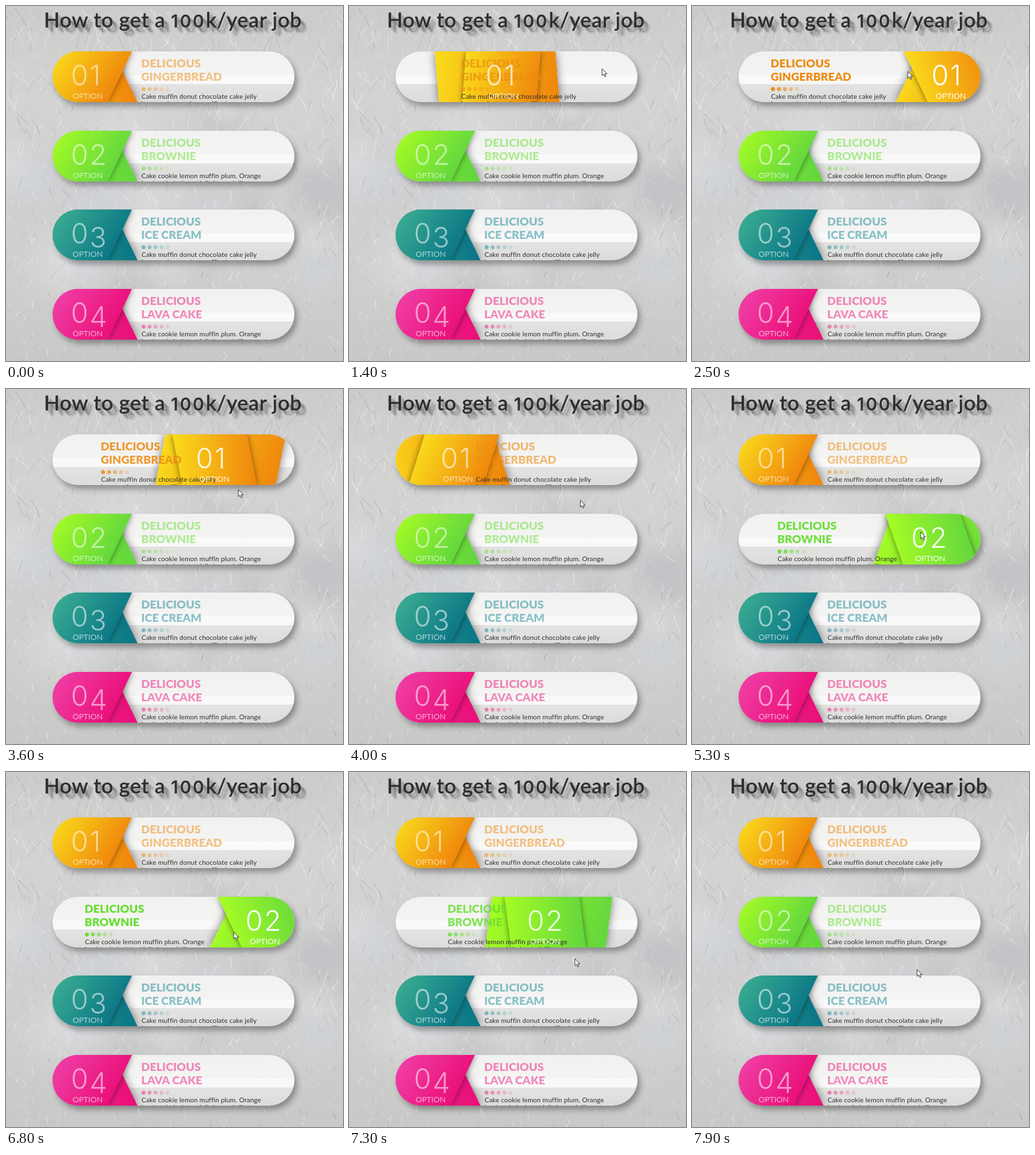
An HTML page with a canvas for the animation above (8000 ms loop, 506x532 px).

```html
<!DOCTYPE html>
<html lang="en">
<head>
<meta charset="utf-8">
<title>Option cards</title>
<style>
  html, body { margin: 0; width: 100%; height: 100%; overflow: hidden; background: #cdcdcb; }
  #stage { position: relative; width: 506px; height: 532px; overflow: hidden; font-family: Lato, "Open Sans", sans-serif; }
  #backdrop, #cursor { position: absolute; left: 0; top: 0; }
  #cursor { z-index: 1; }
  h1 {
    position: absolute; left: 57px; top: 1px; margin: 0;
    font-size: 31px; line-height: 38px; font-weight: 500; letter-spacing: .018em;
    white-space: nowrap; color: #2c2c2e; -webkit-text-stroke: .35px #2c2c2e;
    text-shadow: 4px 4px 2px rgba(0,0,0,.2), 7px 7px 2px rgba(0,0,0,.22), 9px 9px 3px rgba(0,0,0,.12);
  }
  h1 span { font-family: Inter, Lato, sans-serif; font-size: .84em; letter-spacing: .1em; }
  .card {
    --p: 0;
    position: absolute; left: 70px; top: calc(68px + var(--row) * 118.5px);
    width: 363px; height: 76px; border-radius: 38px; overflow: hidden;
    background: linear-gradient(#f1f1f0, #f4f4f3 47%, #fafafa 48%, #f8f8f8 64%, #e3e3e2 65%, #dcdcdb);
    box-shadow: 4px 6px 9px rgba(0,0,0,.33);
  }
  .back, .front {
    position: absolute; top: 0; height: 100%;
    background: linear-gradient(100deg, var(--from), var(--to));
  }
  .back {
    left: -72.5px; width: 181px; box-shadow: 0 0 13px rgba(0,0,0,.5);
    transform: translateX(calc(var(--p) * 326.5px)) skewX(calc(26deg - var(--p) * 52deg));
  }
  .front {
    left: -11px; width: 112px; box-shadow: 0 0 9px rgba(0,0,0,.5);
    transform: translateX(calc(var(--p) * 277px)) skewX(calc(-25.5deg + var(--p) * 51deg));
  }
  .card svg { position: absolute; left: 0; top: 0; }
  .copy { transform: translateX(calc(var(--p) * -85px)); }
  .name { fill: var(--ink); opacity: calc(.5 + var(--p) * .5); font-size: 17px; font-weight: 900; }
  .body { fill: #303030; font-size: 10px; letter-spacing: .01em; }
  .num, .option { fill: #fff; }
  .num {
    font: 350 42px Inter, Lato, sans-serif; letter-spacing: .05em;
    opacity: calc(.55 + var(--p) * .45); transform: translateX(calc(var(--p) * 262px));
  }
  .option {
    font-size: 11.8px; opacity: calc(.65 + var(--p) * .35);
    transform: translateX(calc(var(--p) * 266px));
  }
</style>
</head>
<body>
<div id="stage">
  <canvas id="backdrop" width="506" height="532"></canvas>
  <h1>How to get a <span>100</span>k/year job</h1>
  <svg id="cursor" width="10" height="15" viewBox="-1 -1 10 15">
    <path d="M0 0V10.3L2.4 8.1 4.2 12 5.9 11.2 4.2 7.5H7.4Z" fill="#fff" stroke="#333" stroke-width=".9"/>
  </svg>
</div>
<script>
const stage = document.getElementById('stage');
const cursor = document.getElementById('cursor');
const LOOP = 8000, STEP = 100, SLIDE = 1000;

const donut = ['Cake muffin donut chocolate cake jelly', 'beans cake topping souffle dessert'];
const lemon = ['Cake cookie lemon muffin plum. Orange', 'bonbon halvah tart jelly beans lollipop'];

// over / out: when the pointer enters and leaves the card
const options = [
  { name: 'GINGERBREAD', body: donut, from: '#fadb1c', to: '#ef850c', ink: '#ec8c12', over: 960, out: 3248 },
  { name: 'BROWNIE', body: lemon, from: '#a6fc25', to: '#62d63e', ink: '#68de32', over: 4513, out: 6900 },
  { name: 'ICE CREAM', body: donut, from: '#3cae92', to: '#0b7686', ink: '#1d8a96' },
  { name: 'LAVA CAKE', body: lemon, from: '#f040a8', to: '#ea0f78', ink: '#ea1f80' }
];

// pointer stops: time, x, y
const stops = [
  [0, 525, 112], [1400, 380, 94], [2500, 324, 98], [2800, 324, 98],
  [3600, 349, 151], [4800, 344, 198], [6100, 342, 240], [6800, 342, 240], [7500, 338, 296]
];

function addCard(o, i) {
  const dots = [0, 1, 2, 3, 4].map(k =>
    `<circle cx="${136.5 + 9 * k}" cy="56.5" r="3" opacity="${1 - k * .19}"/>`).join('');
  const drop = i > 1 ? 6 : 0;   // 3 and 4 hang below the baseline
  const card = document.createElement('div');
  card.className = 'card';
  card.style.cssText = `--row:${i};--from:${o.from};--to:${o.to};--ink:${o.ink}`;
  card.innerHTML = `
    <div class="back"></div><div class="front"></div>
    <svg width="363" height="76">
      <g class="copy">
        <g class="name">
          <text x="133" y="24">DELICIOUS</text>
          <text x="133" y="44">${o.name}</text>
          ${dots}
        </g>
        <g class="body">
          <text x="133.5" y="71">${o.body[0]}</text>
          <text x="133.5" y="82.3">${o.body[1]}</text>
        </g>
      </g>
      <text class="num" x="27.5" y="51">0<tspan dy="${drop}">${i + 1}</tspan></text>
      <text class="option" x="30" y="71">OPTION</text>
    </svg>`;
  stage.append(card);
  return card;
}

function paintBackdrop() {
  const { width: w, height: h } = stage.querySelector('canvas');
  const c = document.getElementById('backdrop').getContext('2d');
  let seed = 71;
  const rnd = () => (seed = seed * 16807 % 2147483647) / 2147483647;
  const between = (a, b) => a + rnd() * (b - a);

  const base = c.createLinearGradient(0, 0, 0, h);
  ['#cbcbc9', '#d3d3d2', '#cfcfd0', '#cfcfce', '#c8c8c7'].forEach((ink, k) => base.addColorStop(k / 4, ink));
  c.fillStyle = base;
  c.fillRect(0, 0, w, h);

  // soft light and dark patches in the middle of the scene
  for (let k = 0; k < 24; k++) {
    const x = between(0, w), y = between(140, 430), r = between(20, 80);
    const ink = ['240,240,240', '176,179,184', '206,216,232'][k % 3];
    const glow = c.createRadialGradient(x, y, 0, x, y, r);
    glow.addColorStop(0, `rgba(${ink},.3)`);
    glow.addColorStop(1, `rgba(${ink},0)`);
    c.fillStyle = glow;
    c.fillRect(x - r, y - r, 2 * r, 2 * r);
  }

  // thin scratches, longest at the top
  for (let k = 0; k < 1300; k++) {
    const x = between(0, w), y = between(0, h);
    const len = between(4, 12 + 38 * (1 - y / h) ** 2);
    const a = Math.PI / 2 + between(-.9, .9);
    const ex = x + Math.cos(a) * len, ey = y + Math.sin(a) * len;
    const ink = k % 4 ? '248,248,248' : '158,160,164';
    c.strokeStyle = `rgba(${ink},${between(.2, .7)})`;
    c.lineWidth = between(.4, 1.1);
    c.beginPath();
    c.moveTo(x, y);
    c.quadraticCurveTo((x + ex) / 2 + between(-6, 6), (y + ey) / 2, ex, ey);
    c.stroke();
  }
}

const clamp = s => Math.min(1, Math.max(0, s));
const smooth = s => clamp(s) ** 2 * (3 - 2 * clamp(s));

function pointerAt(t) {
  const k = stops.findLastIndex((s, i) => s[0] <= t && i < stops.length - 1);
  const [t0, x0, y0] = stops[k], [t1, x1, y1] = stops[k + 1];
  const s = clamp((t - t0) / (t1 - t0));
  return [x0 + (x1 - x0) * s, y0 + (y1 - y0) * s];
}

paintBackdrop();
const cards = options.map(addCard);
const start = performance.now();

function draw() {
  const t = Math.floor((performance.now() - start) % LOOP / STEP) * STEP;
  options.forEach((o, i) => {
    if (!o.over) return;
    const p = smooth((t - o.over) / SLIDE) - smooth((t - o.out) / SLIDE);
    cards[i].style.setProperty('--p', p.toFixed(4));
  });
  const [x, y] = pointerAt(t);
  cursor.style.transform = `translate(${x - 1}px, ${y - 1}px)`;
  requestAnimationFrame(draw);
}
draw();
</script>
</body>
</html>
```
